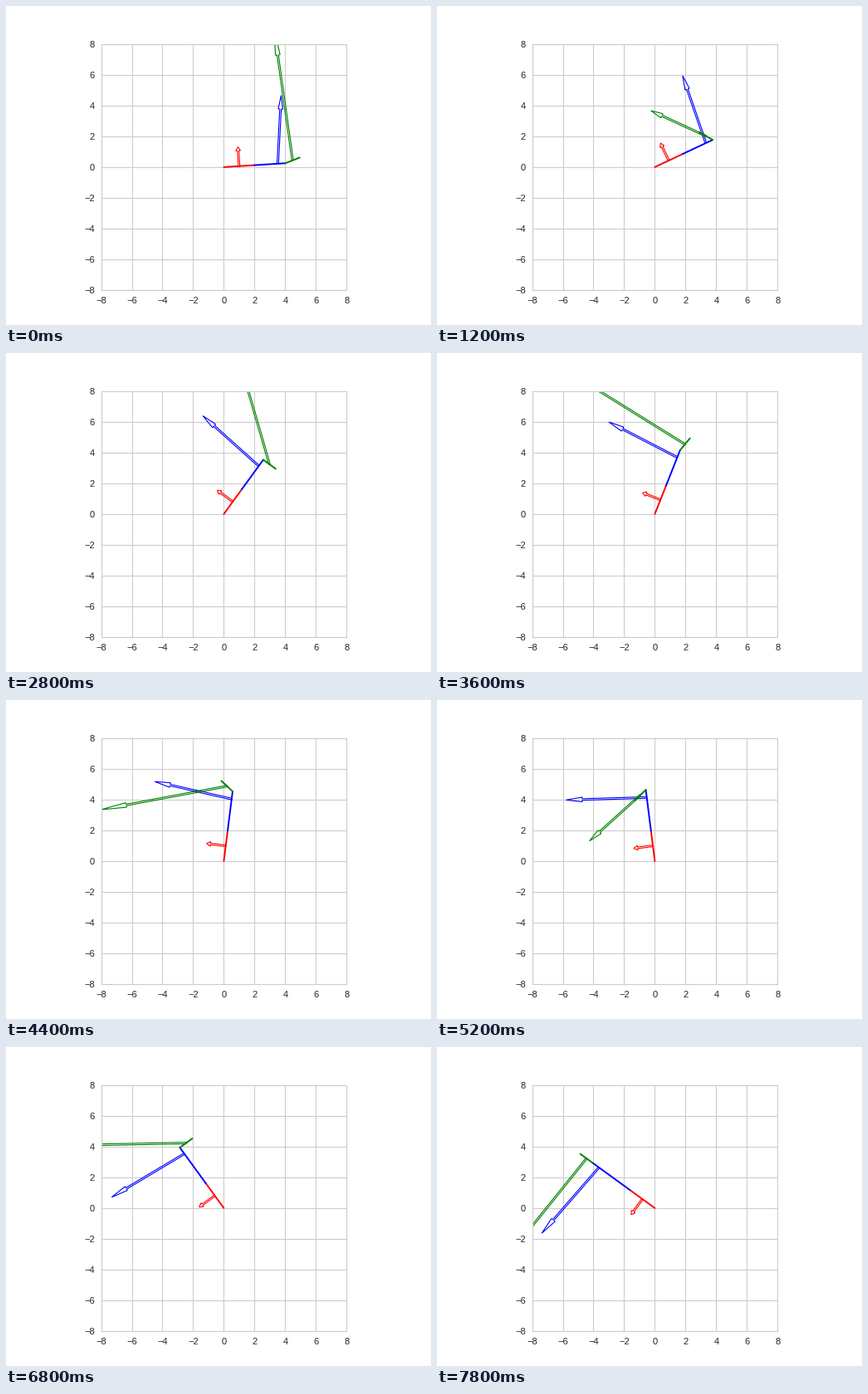
Write a matplotlib script that moves like this. It is 512 px wide and 384 px high and loops after 8 s.

```python
import numpy as np
import matplotlib.pyplot as plt
from matplotlib.animation import FuncAnimation
from matplotlib.patches import Polygon

plt.rcParams.update({
    "font.family": "Liberation Sans",
    "font.size": 10,
    "axes.edgecolor": "0.8",
    "axes.linewidth": 1,
    "axes.axisbelow": True,
    "grid.color": "0.8",
    "grid.linewidth": 1,
    "lines.linewidth": 1.75,
    "lines.solid_capstyle": "round",
})

FRAMES = 40
DT = 0.05                # simulated seconds per frame
BASE, TIP = 2.0, 1.0     # lengths of the fixed links
REACH, SLIDE = 4.0, 0.5  # start and speed of the sliding joint
W1, W3 = 2 * np.pi / 5, 2 * np.pi
ARROW_WIDTH = 0.5
COLORS = [(1, 0, 0), (0, 0, 1), (0, 0.5, 0)]

# Unit arrow along x: (fraction of length, fraction of width)
ARROW = np.array([(0, 0.1), (0, -0.1), (0.8, -0.1), (0.8, -0.3),
                  (1, 0), (0.8, 0.3), (0.8, 0.1)])


def unit(angle):
    return np.array([np.cos(angle), np.sin(angle)])


def perp(v):
    return np.array([-v[1], v[0]])


def arrow_points(start, vec):
    side = perp(vec) / np.hypot(*vec) * ARROW_WIDTH
    return start + ARROW[:, :1] * vec + ARROW[:, 1:] * side


def arm(t):
    """Return the joints, the mass centres and their velocities at time t."""
    u = unit(W1 * t)
    v = unit((W1 + W3) * t)
    reach = REACH + SLIDE * t
    elbow = reach * u
    joints = [np.zeros(2), BASE * u, elbow, elbow + TIP * v]

    r2 = reach - 0.5
    centres = [BASE / 2 * u, r2 * u, elbow + TIP / 2 * v]
    speeds = [W1 * BASE / 2 * perp(u),
              SLIDE * u + W1 * r2 * perp(u),
              SLIDE * u + W1 * reach * perp(u) + (W1 + W3) * TIP / 2 * perp(v)]
    return joints, centres, speeds


fig, ax = plt.subplots(figsize=(6.4, 4.8), dpi=80, facecolor="white")
fig.subplots_adjust(left=0.125, right=0.9, bottom=0.11, top=0.88)
ax.set_aspect("equal")
ax.set(xlim=(-8, 8), ylim=(-8, 8),
       xticks=range(-8, 9, 2), yticks=range(-8, 9, 2))
ax.grid(True)
ax.tick_params(length=0, pad=7, labelcolor="0.15")

links = [ax.plot([], [], color=c)[0] for c in COLORS]
arrows = [ax.add_patch(Polygon(ARROW, closed=True, fill=False, edgecolor=c, lw=1))
          for c in COLORS]


def update(i):
    joints, centres, speeds = arm((i + 1) * DT)
    for k in range(3):
        links[k].set_data(*zip(joints[k], joints[k + 1]))
        arrows[k].set_xy(arrow_points(centres[k], speeds[k]))
    return links + arrows


anim = FuncAnimation(fig, update, frames=FRAMES, interval=200,
                     repeat=True, repeat_delay=0)
plt.show()
```
